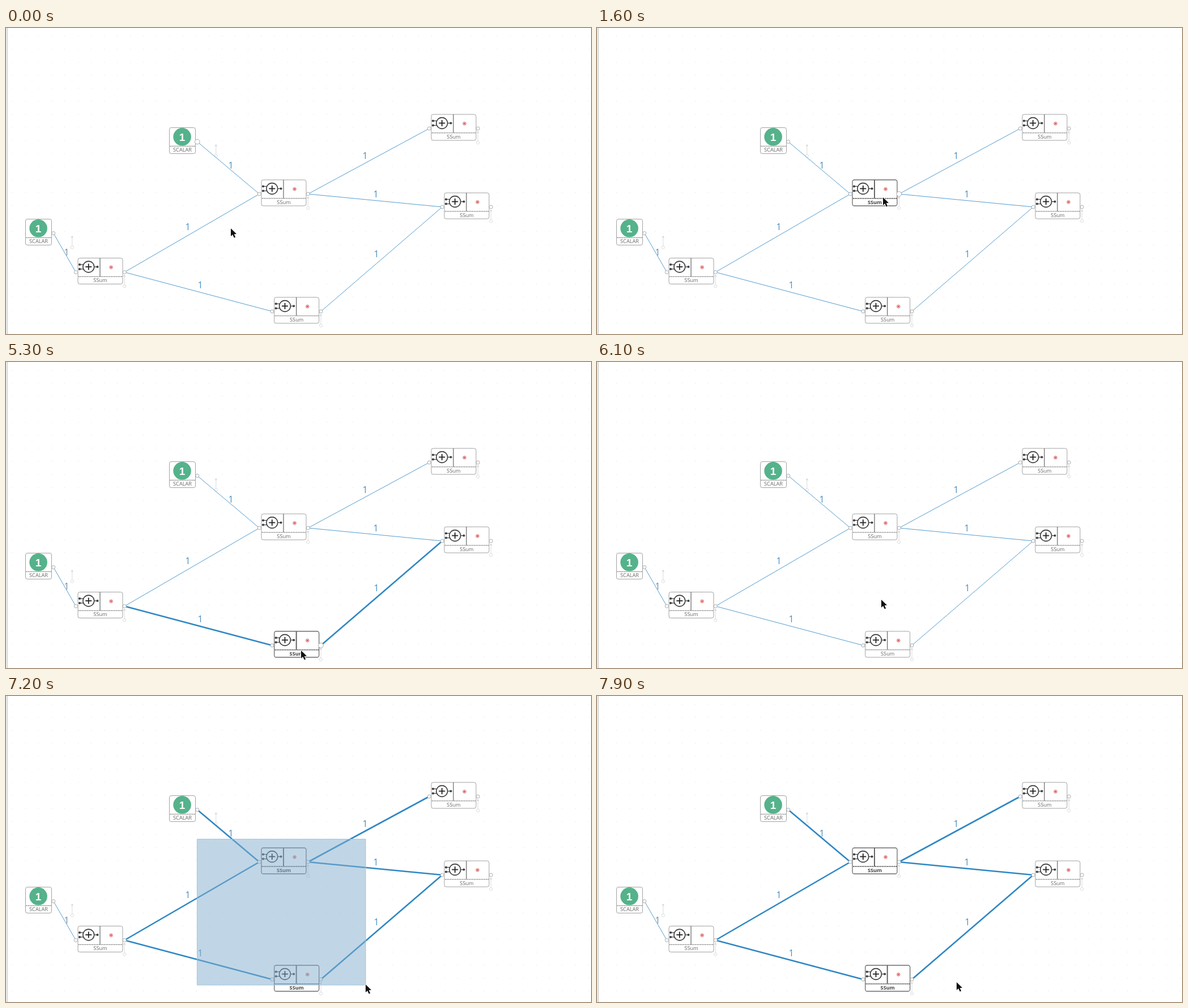
Write an HTML page with a canvas that moves like this. It is 1033 by 542 pixels and loops after 8 s.

```html
<!DOCTYPE html>
<html lang="en">
<head>
<meta charset="utf-8">
<title>Node graph selection</title>
<style>
  html, body { margin: 0; width: 100%; height: 100%; overflow: hidden; background: #fff; }
  canvas { display: block; }
</style>
</head>
<body>
<canvas id="stage" width="1033" height="542"></canvas>
<script>
const ctx = document.getElementById('stage').getContext('2d');
const LOOP = 8000, TICK = 100, GRID = 23.13;
const INK = '#3c3f42', LABEL = '#686868', FAINT = '#dcdcdc';

const scalars = { left: [34.5, 338.5], top: [288.5, 176.5] };
const sums = {
  west: [127, 407.5], mid: [451, 269], south: [473.7, 477],
  east: [774, 292], north: [751, 153]
};

// from, to, label x, label y
const wires = [
  ['left', 'west', 107, 397],
  ['top', 'mid', 397, 243],
  ['west', 'mid', 321, 352],
  ['west', 'south', 343, 455],
  ['mid', 'north', 634, 226],
  ['mid', 'east', 653, 294.5],
  ['south', 'east', 654, 400]
];

// time, x, y: the pointer rests at each stop until the next one
const pointerStops = [
  [0, 397, 355], [1400, 505, 300], [4600, 520, 510], [5200, 521, 511],
  [6000, 514, 470], [6100, 502, 421], [6300, 440, 337], [6500, 385, 290],
  [6600, 339, 255], [6800, 475, 350], [6900, 529, 415], [7100, 604, 475],
  [7200, 635, 511], [7700, 634, 508], [7900, 635, 507]
];
const bandStops = [
  [6800, 470, 345], [6900, 525, 410], [7100, 600, 470], [7200, 635, 512]
];

const during = (t, from, to) => t >= from && t < to;
const stopAt = (stops, t) => stops.filter(s => s[0] <= t).pop();

function pointerAt(t) {
  if (during(t, 500, 1400)) {
    const k = (t - 500) / 900;
    return [397 + 108 * k, 355 - 55 * k];
  }
  return stopAt(pointerStops, t).slice(1);
}

function sumSelected(name, t) {
  if (name === 'mid') return during(t, 1600, 4600) || t >= 6800;
  if (name === 'south') return during(t, 5200, 5800) || t >= 7200;
  return false;
}

function wireSelected([from, to], t) {
  if (from === 'south' || to === 'south') return during(t, 5300, 5800) || t >= 7200;
  if (to === 'mid') return t >= 6800;
  if (from === 'mid') return t >= 7100;
  return false;
}

function portHovered(name, t) {
  if (name === 'top') return t < 600 || during(t, 6500, 6800);
  if (name === 'mid') return during(t, 1000, 4600) || during(t, 6300, 6500);
  if (name === 'south') return during(t, 4600, 6000);
  return false;
}

function outPort(name) {
  const [x, y] = scalars[name] || sums[name];
  return [x + (scalars[name] ? 49.3 : 82.3), y + 25];
}

function inPort(name) {
  const [x, y] = sums[name];
  return [x - 3.7, y + 25];
}

function line(x1, y1, x2, y2, color, width = 1, dash = []) {
  ctx.beginPath();
  ctx.moveTo(x1, y1);
  ctx.lineTo(x2, y2);
  ctx.setLineDash(dash);
  ctx.strokeStyle = color;
  ctx.lineWidth = width;
  ctx.stroke();
  ctx.setLineDash([]);
}

function circle(x, y, r, fill, stroke, width = 1) {
  ctx.beginPath();
  ctx.arc(x, y, r, 0, Math.PI * 2);
  if (fill) { ctx.fillStyle = fill; ctx.fill(); }
  if (stroke) { ctx.strokeStyle = stroke; ctx.lineWidth = width; ctx.stroke(); }
}

function text(str, x, y, font, color) {
  ctx.font = font;
  ctx.fillStyle = color;
  ctx.textAlign = 'center';
  ctx.fillText(str, x, y);
}

function card(x, y, w, title, bold) {
  ctx.beginPath();
  ctx.roundRect(x, y, w, 46, 3.5);
  ctx.fillStyle = '#fff';
  ctx.fill();
  ctx.strokeStyle = bold ? '#6c6c6c' : '#a2a2a2';
  ctx.lineWidth = bold ? 1.3 : 1;
  ctx.stroke();
  line(x + 1, y + 32.8, x + w - 1, y + 32.8, '#555', bold ? 1.7 : 1, [2, 1]);
  text(title, x + w / 2, y + 42.8,
    `${bold ? 700 : 400} 9.2px "Open Sans", sans-serif`, bold ? '#444' : LABEL);
}

function pin(x, y) {
  line(x, y + 31, x, y + 47.5, FAINT);
  line(x - 1.5, y + 33, x, y + 30, '#ccc');
  line(x + 1.5, y + 33, x, y + 30, '#ccc');
  circle(x, y + 50, 2.6, '#fff', FAINT);
}

function port([x, y], hovered) {
  circle(x, y, hovered ? 4.3 : 3, '#fff', '#aaa');
}

function drawScalar(name, t) {
  const [x, y] = scalars[name];
  card(x, y, 46, 'SCALAR', false);
  circle(x + 22.6, y + 16.3, 15.8, '#55b28b');
  text('1', x + 22.6, y + 23.2, '700 19px "Liberation Sans", sans-serif', '#fff');
  port(outPort(name), portHovered(name, t));
}

function drawSum(name, t) {
  const [x, y] = sums[name], bold = sumSelected(name, t);
  const cx = x + 18.8, cy = y + 15.5;
  card(x, y, 79, 'SSum', bold);
  line(x + 39, y, x + 39, y + 32.5, '#666', bold ? 2 : 1.2);
  for (const dy of [-4, 4]) {
    line(x + 3.5, cy + dy, cx - 9, cy + dy, INK, 1.2);
    circle(x + 3, cy + dy, 2.1, INK);
  }
  line(cx + 10, cy, x + 34, cy, INK, 1.2);
  circle(x + 34.5, cy, 2.1, INK);
  circle(cx, cy, 9.9, '#fff', INK, 1.6);
  line(cx - 5.5, cy, cx + 5.5, cy, '#222', 1.8);
  line(cx, cy - 5.5, cx, cy + 5.5, '#222', 1.8);
  circle(x + 58.6, y + 16.3, 2.8, '#f7c9c9', '#df7777');
  circle(x + 58.6, y + 16.3, 1.3, '#cf4545');
  port(inPort(name), false);
  port(outPort(name), portHovered(name, t));
}

function drawBackground() {
  ctx.fillStyle = '#fff';
  ctx.fillRect(0, 0, 1033, 542);
  ctx.fillStyle = '#dedede';
  for (let x = 11.4; x < 1033; x += GRID)
    for (let y = 14; y < 542; y += GRID)
      ctx.fillRect(Math.round(x - 0.5), Math.round(y - 0.5), 1, 1);
  ctx.fillStyle = '#ececec';
  ctx.fillRect(0, 0, 2, 542);
  ctx.fillStyle = '#cccccc';
  ctx.fillRect(2, 0, 1, 542);
}

function drawWire(wire, t) {
  const [from, to, x, y] = wire, bold = wireSelected(wire, t);
  line(...outPort(from), ...inPort(to), bold ? '#2f87c3' : '#559cce', bold ? 2.6 : 1);
  text('1', x, y + 5.7, '400 16px "Open Sans", sans-serif',
    from === 'left' ? '#7189a0' : '#4b8dbd');
}

function drawBand(t) {
  if (!during(t, 6800, 7500)) return;
  const [, right, bottom] = stopAt(bandStops, t);
  const box = [337.5, 253.5, right - 337.5, bottom - 253.5];
  ctx.fillStyle = 'rgba(129, 173, 205, 0.5)';
  ctx.fillRect(...box);
  ctx.strokeStyle = '#a1c4de';
  ctx.lineWidth = 1;
  ctx.strokeRect(...box);
}

function drawPointer([x, y]) {
  const outline = [[0, 0], [0, 14], [3.2, 11], [5.8, 16.6], [8.2, 15.5], [5.7, 10.2], [10, 9.8]];
  ctx.beginPath();
  for (const [dx, dy] of outline) ctx.lineTo(x + dx, y + dy);
  ctx.closePath();
  ctx.lineJoin = 'round';
  ctx.strokeStyle = '#fff';
  ctx.lineWidth = 1.6;
  ctx.stroke();
  ctx.fillStyle = '#111';
  ctx.fill();
}

function draw(now) {
  const t = Math.floor((now % LOOP) / TICK) * TICK;
  drawBackground();
  for (const [x, y] of Object.values(scalars)) pin(x + 82.3, y);
  for (const [x, y] of Object.values(sums)) pin(x + 82.3, y);
  wires.forEach(wire => drawWire(wire, t));
  Object.keys(scalars).forEach(name => drawScalar(name, t));
  Object.keys(sums).forEach(name => drawSum(name, t));
  drawBand(t);
  drawPointer(pointerAt(t));
}

const start = performance.now();
function loop() {
  draw(performance.now() - start);
  requestAnimationFrame(loop);
}
loop();
</script>
</body>
</html>
```
